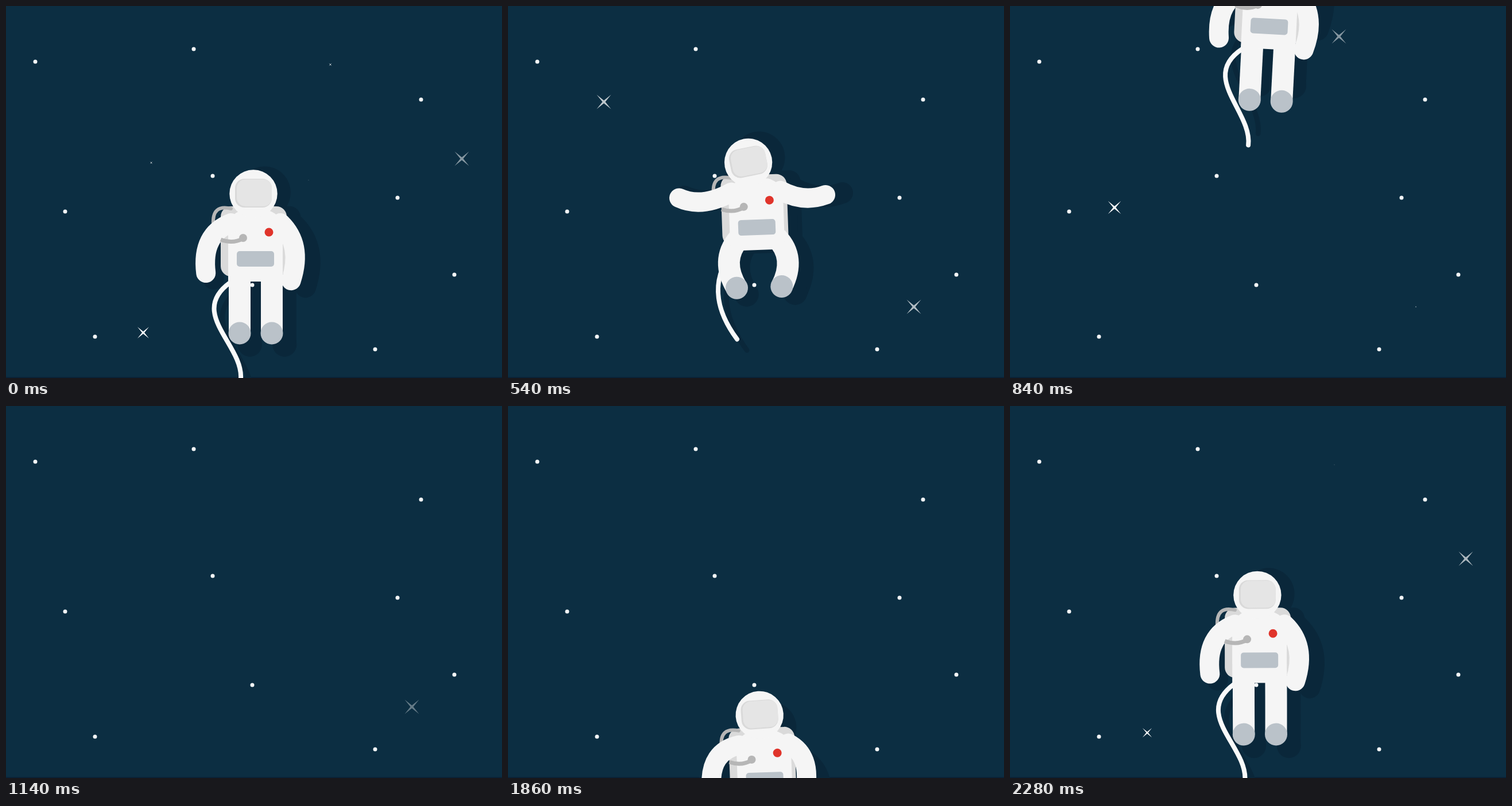
These frames come from a looping animation (864x648 px, 2310 ms). An HTML page with a canvas:

```html
<!DOCTYPE html>
<html lang="en">
<head>
<meta charset="utf-8">
<title>Floating astronaut</title>
<style>
  html, body { margin: 0; width: 100%; height: 100%; overflow: hidden; background: #0c2e42; }
  canvas { display: block; }
</style>
</head>
<body>
<canvas id="stage" width="864" height="648"></canvas>
<script>
const ctx = document.getElementById('stage').getContext('2d');
const LOOP = 2310, STEP = 30, ENTER = 1650, EXIT = 1125;
const SUIT = '#f5f5f5', PACK = '#dadada', HOSE = '#b6b6b6', STEEL = '#bac2c9', SHADE = '#0a273a';

// One swimming stroke: time, x, y, tilt in degrees, raise (0 arms down, 1 arms up).
// Times below zero are the end of the previous loop.
const PATH = [
  [-660, 455, 792, 0, 0],
  [-270, 442, 545, -3, 0.3],
  [0, 435, 440, 0, 0],
  [300, 436, 439, -4, 1],
  [540, 434, 385, -2, 0.93],
  [840, 452, 35, 3, 0],
  [1120, 449, -228, 3, 0]
];

const DOTS = [[51, 97], [327, 75], [723, 163], [360, 296], [682, 334],
  [103, 358], [429, 486], [781, 468], [155, 576], [643, 598]];

// x, y, birth time
const SPARKS = [
  [540, 277, 100], [573, 53, 145], [182, 351, 145], [707, 524, 280], [167, 167, 290],
  [573, 53, 545], [182, 351, 660], [707, 524, 820], [126, 127, 1860], [794, 266, 2015],
  [239, 569, 2150], [565, 102, 2270], [253, 273, 2275], [527, 303, 2300]
];
const GROW = 200, LIFE = 390, SPARK = 12.5;

const rad = deg => deg * Math.PI / 180;
const mix = (a, b, u) => a + (b - a) * u;

// Monotone cubic interpolation of one column
function sample(col, t) {
  const slope = i => (PATH[i + 1][col] - PATH[i][col]) / (PATH[i + 1][0] - PATH[i][0]);
  const last = PATH.length - 1;
  const tangent = i => {
    if (i === 0) return slope(0);
    if (i === last) return slope(last - 1);
    const a = slope(i - 1), b = slope(i);
    return a * b > 0 ? 2 * a * b / (a + b) : 0;
  };
  let i = 0;
  while (i < last - 1 && t >= PATH[i + 1][0]) i++;
  const h = PATH[i + 1][0] - PATH[i][0], u = (t - PATH[i][0]) / h, v = 1 - u;
  return PATH[i][col] * v * v * (1 + 2 * u) + PATH[i + 1][col] * u * u * (3 - 2 * u)
    + h * u * v * (v * tangent(i) - u * tangent(i + 1));
}

function poseAt(t) {
  const [x, y, tilt, raise] = [1, 2, 3, 4].map(col => sample(col, t));
  return { x, y, tilt, raise };
}

function disc(x, y, r, color) {
  ctx.fillStyle = color;
  ctx.beginPath();
  ctx.arc(x, y, r, 0, 7);
  ctx.fill();
}

function box(x, y, w, h, r, color) {
  ctx.fillStyle = color;
  ctx.beginPath();
  ctx.roundRect(x, y, w, h, r);
  ctx.fill();
}

// Quadratic with four coordinates after the start, cubic with six
function line(width, color, x, y, ...to) {
  ctx.strokeStyle = color;
  ctx.lineWidth = width;
  ctx.beginPath();
  ctx.moveTo(x, y);
  if (to.length === 4) ctx.quadraticCurveTo(...to);
  else ctx.bezierCurveTo(...to);
  ctx.stroke();
}

function rope(raise, color) {
  line(8, color, -45, 42, mix(-118, -87, raise), 95, mix(-22, -76, raise), 150,
    mix(-26, -43, raise), mix(209, 193, raise));
}

function leg(side, raise, color, boot) {
  const footX = side * mix(28, 40, raise), footY = mix(130, 103, raise);
  line(38, color, side * mix(28, 34, raise), 20, side * mix(28, 69, raise), 56, footX, footY);
  disc(footX, footY, 19.5, boot);
}

// The elbow lifts halfway through the stroke; the forearm foreshortens when level
function arm(side, raise, elbowX, low, high, from, to, color) {
  const lift = Math.sin(Math.PI * raise);
  const elbowY = mix(low, high, raise) - 22 * lift;
  const a = rad(mix(from, to, raise * raise));
  const len = 68 - 27 * Math.sin(a) ** 2 - 12 * lift;
  line(34, color, side * 43, -62, side * elbowX, elbowY,
    side * (elbowX + Math.sin(a) * len), elbowY + Math.cos(a) * len);
}

function torso(color) {
  ctx.fillStyle = color;
  ctx.beginPath();
  ctx.moveTo(-48, 40);
  ctx.lineTo(-48, -55);
  ctx.quadraticCurveTo(-46, -76, -26, -84);
  ctx.lineTo(22, -84);
  ctx.quadraticCurveTo(45, -76, 47, -55);
  ctx.lineTo(47, 40);
  ctx.fill();
}

// With a flat colour only the silhouette is drawn
function astronaut({ tilt, raise }, flat) {
  const tint = color => flat || color;
  ctx.rotate(rad(tilt));
  ctx.lineCap = 'round';
  rope(raise, tint('#fafafa'));
  box(-61, -91, 115, 122, 18, tint(PACK));
  line(6, tint(HOSE), -43, -87, -76, -95, -74, -60);

  ctx.lineCap = 'butt';
  for (const side of [-1, 1]) leg(side, raise, tint(SUIT), tint(STEEL));
  ctx.lineCap = 'round';
  torso(tint(SUIT));
  arm(-1, raise, 95, -42, -30, -7, 136, tint(SUIT));
  arm(1, raise, 82, -24, -35, -18, 128, tint(SUIT));

  if (!flat) {
    ctx.lineCap = 'butt';
    line(7, HOSE, -61, -33, -40, -25, -22, -35);
    disc(-22, -36, 7, HOSE);
    disc(23, -46, 7.5, '#e0342b');
    box(-33, -13, 65, 27, 5, STEEL);
  }

  ctx.translate(-4 - 8 * raise, -113);
  ctx.rotate(rad(-10 * raise));
  disc(0, 0, 41.7, tint(SUIT));
  if (!flat) {
    box(-32, -26, 64, 50, 16, '#d9d9d9');
    box(-29, -25, 61, 47, 15, '#e5e5e5');
  }
}

function spark([x, y, birth], t) {
  const age = (t - birth + LOOP) % LOOP;
  if (age >= LIFE) return;
  const s = SPARK * Math.min(1, age / GROW), w = s * 0.2;
  ctx.save();
  ctx.translate(x, y);
  ctx.globalAlpha = Math.min(1, (LIFE - age) / (LIFE - GROW));
  ctx.fillStyle = '#fff';
  ctx.beginPath();
  for (let i = 0; i < 4; i++) {
    ctx.lineTo(s, s);
    ctx.lineTo(0, w);
    ctx.rotate(Math.PI / 2);
  }
  ctx.fill();
  ctx.restore();
}

function render(time) {
  const t = Math.floor((time % LOOP) / STEP) * STEP;
  const visible = t < EXIT || t >= ENTER;
  const p = visible && poseAt(t >= ENTER ? t - LOOP : t);

  ctx.fillStyle = '#0c2e42';
  ctx.fillRect(0, 0, 864, 648);
  ctx.fillStyle = '#0a2036';
  ctx.fillRect(0, 646.5, 864, 1.5);

  if (visible) {
    ctx.save();
    ctx.translate(p.x + 20, p.y + 8 + (p.y - 440) * 0.115);
    ctx.scale(1.08, 1.09);
    astronaut(p, SHADE);
    ctx.restore();
  }

  for (const [x, y] of DOTS) disc(x, y, 3.5, '#f4f6f7');
  for (const s of SPARKS) spark(s, t);

  if (visible) {
    ctx.save();
    ctx.translate(p.x, p.y);
    astronaut(p);
    ctx.restore();
  }
}

const start = performance.now();
function tick() {
  render(performance.now() - start);
  requestAnimationFrame(tick);
}
tick();
</script>
</body>
</html>
```
